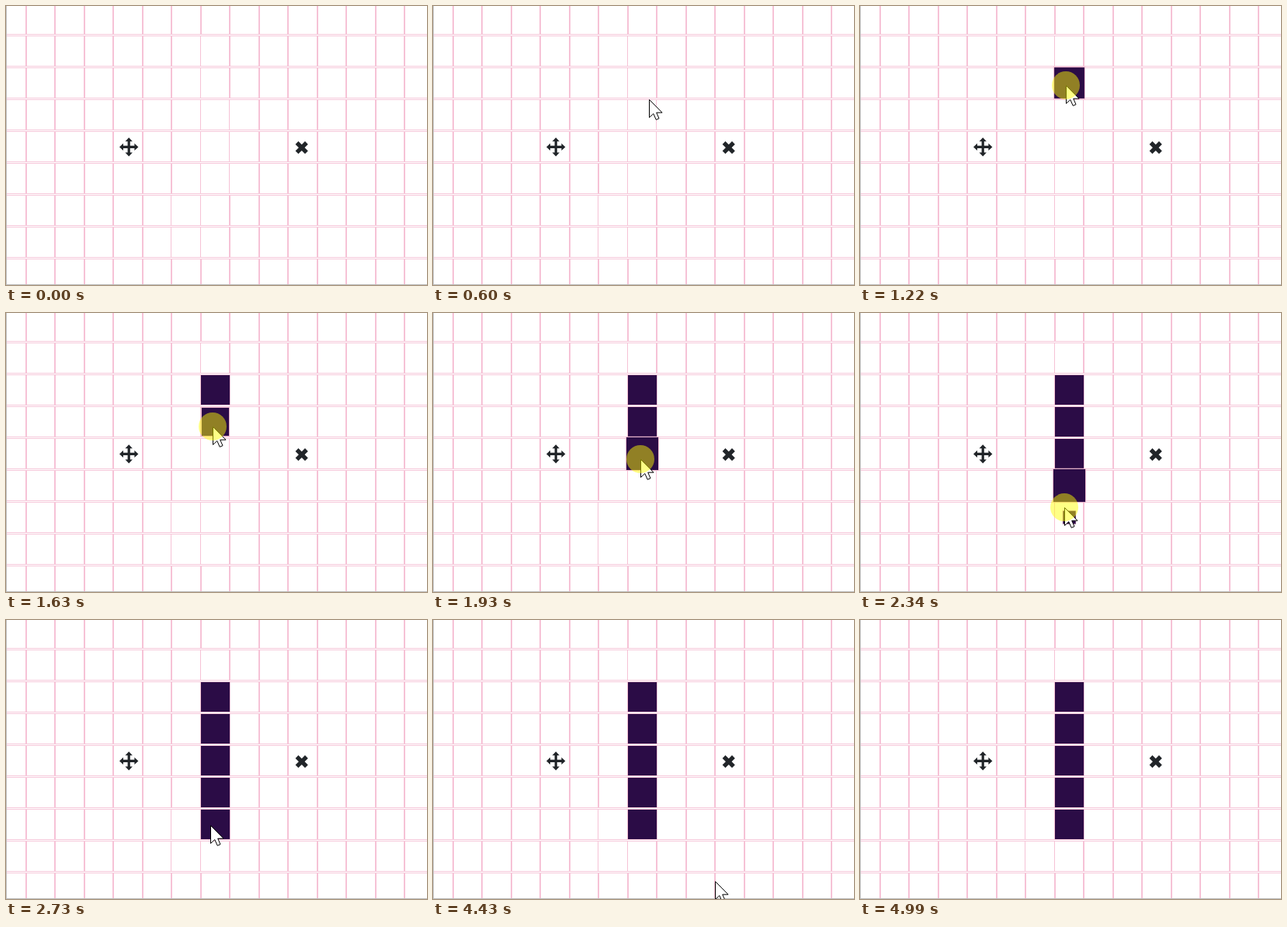
Animation, 542 px wide and 359 px high, one loop 5.14 s. Source, as an HTML page:

```html
<!DOCTYPE html>
<html lang="en">
<head>
<meta charset="utf-8">
<title>Drawing walls on a grid</title>
<style>
  html, body { margin: 0; width: 100%; height: 100%; overflow: hidden; background: #fff; }
  svg { display: block; }
</style>
</head>
<body>
<svg width="542" height="359" viewBox="0 0 542 359">
  <g id="grid" shape-rendering="crispEdges"></g>
  <g transform="translate(158.2 181.4)" fill="#212529">
    <path d="M-8 0H8M0 -8V8" stroke="#212529" stroke-width="3.2"/>
    <g id="heads"></g>
  </g>
  <path transform="translate(380.7 182.2)" d="M-6.2 -6.2L6.2 6.2M-6.2 6.2L6.2 -6.2" stroke="#212529" stroke-width="5.4"/>
  <g id="walls"></g>
  <path id="cursor" d="M.5 .5V23.5L5.8 18.6L9.2 26.3L13 24.7L9.7 17.2H17Z" fill="#fff" stroke="#000"/>
  <circle id="press" r="18" fill="#ff0" fill-opacity=".48"/>
</svg>
<script>
const LOOP = 5140, COL = 37.5, ROW = 41;
const FIRST = 140, STEP = 78.2;   // the screen updates in regular steps
const GROW = 430;                 // time a wall takes to pop up
const PINK = '#f6c2d6', PALE = '#f6c8da', GREY = '#bdbdbd';
const $ = id => document.getElementById(id);

function add(parent, tag, attrs) {
  const el = document.createElementNS('http://www.w3.org/2000/svg', tag);
  for (const key in attrs) el.setAttribute(key, attrs[key]);
  return parent.appendChild(el);
}
const box = (x, y, width, height, fill) => add($('grid'), 'rect', { x, y, width, height, fill });

// Some column lines near the middle are only one pixel wide
const isThin = (c, r) =>
  (c === 5 && r > 5 && r < 8) || (c === 6 && r > 0 && r < 8) || (c === 7 && r > 2 && r < 6);

for (let c = 0; c < 14; c++)
  for (let r = 0; r < 9; r++)
    box(Math.floor(25 + c * COL), r * ROW - 3, isThin(c, r) ? 1 : 2, ROW, PINK);

for (let y = 36; y < 359; y += ROW) {
  box(0, y, 542, 3, PALE);
  box(0, y + 1, 542, 1, '#fff');
}
box(0, 0, 1, 359, GREY);
box(0, 358, 542, 1, GREY);

for (let a = 0; a < 360; a += 90)
  add($('heads'), 'path', { d: 'M12.2 0L7.2 -4.7V4.7Z', transform: `rotate(${a})` });

// The first wall is clicked, the others follow as the pointer is dragged down
const walls = Array.from({ length: 5 }, (_, i) => ({
  start: i ? 1195 + i * 275 : 1056,
  y: 99 + i * ROW,
  el: add($('walls'), 'rect', { x: -19, y: -19.5, width: 38, height: 39, fill: '#2b0c46', stroke: PINK })
}));

// Pointer path: time, x, y
const path = [
  [140, 372, 293], [300, 313, 212], [609, 278, 120], [844, 265, 102], [1300, 265, 102],
  [1939, 267, 188], [2330, 263, 250], [2564, 263, 264], [4400, 263, 264], [4441, 363, 336]
];

function pointerAt(t) {
  const i = path.findIndex(p => p[0] >= t);
  if (i < 1) return path[i < 0 ? path.length - 1 : 0].slice(1);
  const a = path[i - 1], b = path[i], k = (t - a[0]) / (b[0] - a[0]);
  return [1, 2].map(n => Math.round(a[n] + (b[n] - a[n]) * k));
}

function wallScale(age) {
  const k = Math.max(0, Math.min(age / GROW, 1));
  return k < 0.5 ? 0.3 + 1.8 * k : 1.4 - 0.4 * k;
}

const show = (el, on) => el.setAttribute('visibility', on ? 'visible' : 'hidden');

function render(time) {
  const t = FIRST + STEP * Math.floor((time - FIRST) / STEP + 0.27);
  const [x, y] = pointerAt(t);
  for (const { start, y: cy, el } of walls) {
    show(el, t >= start);
    el.setAttribute('transform', `translate(269.5 ${cy}) scale(${wallScale(t - start)})`);
  }
  for (const id of ['cursor', 'press']) $(id).setAttribute('transform', `translate(${x} ${y})`);
  show($('cursor'), t >= FIRST && t < 4500);
  show($('press'), t > 960 && t < 2620);
}

const began = performance.now();
function frame() {
  render((performance.now() - began) % LOOP);
  requestAnimationFrame(frame);
}
frame();
</script>
</body>
</html>
```
